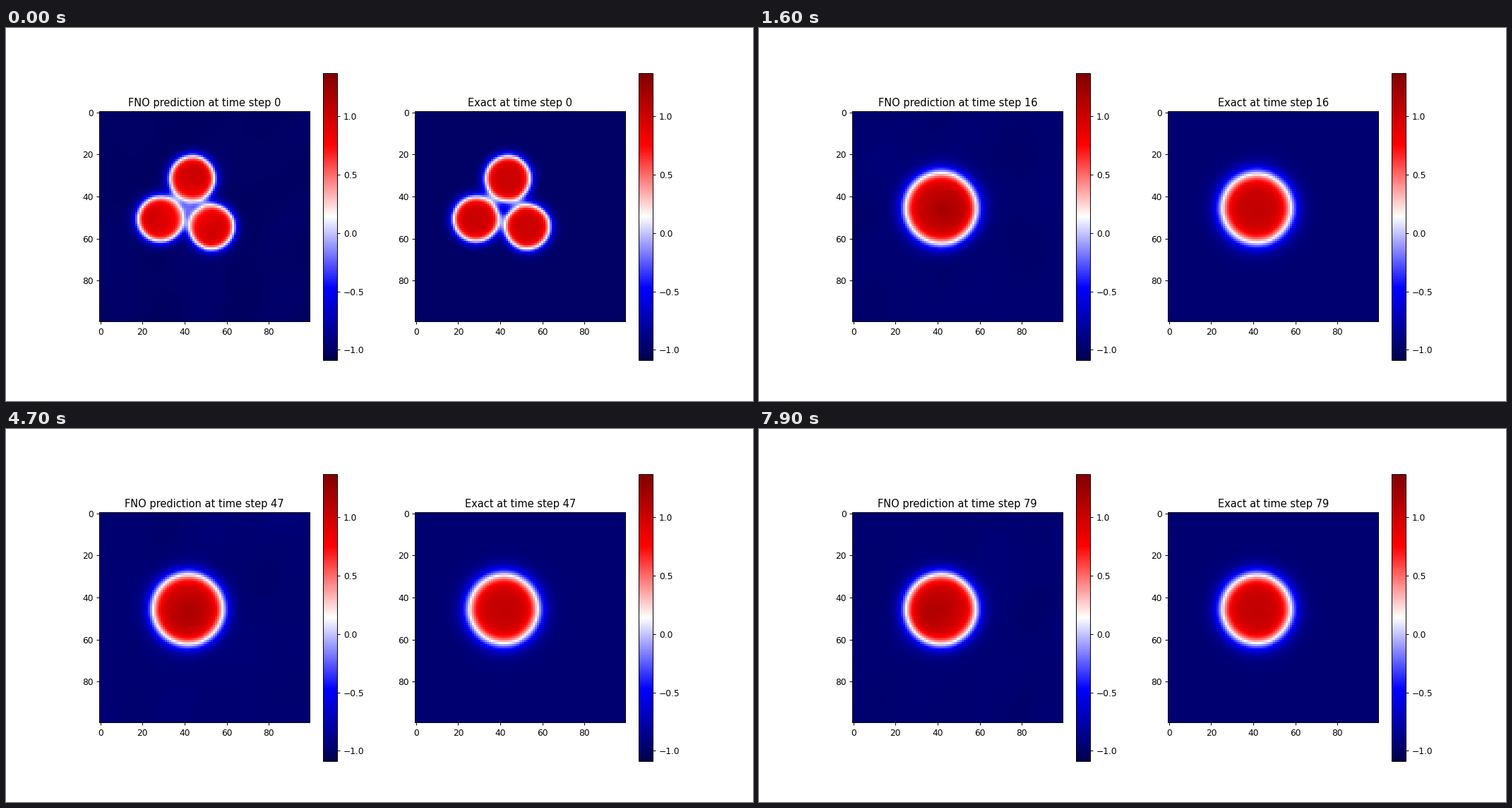
A matplotlib script that plays this animation: 1058x529 px, repeating every 8000 ms.

```python
import numpy as np
import matplotlib.pyplot as plt
from matplotlib.animation import FuncAnimation

N, STEPS = 100, 80
DPI = 529 / 6
VMIN, VMAX = -1.087, 1.37
DT = 2.0
DISCS = [(43.6, 31.7), (28.4, 51.0), (52.8, 54.7)]
CX, CY = 41.6, 45.9

plt.rcParams["font.family"] = "DejaVu Sans"
yy, xx = np.mgrid[0:N, 0:N].astype(float)
radius = np.hypot(xx - CX, yy - CY)


def start_field():
    u = -np.ones((N, N))
    for x, y in DISCS:
        u += 1 + np.tanh((10.8 - np.hypot(xx - x, yy - y)) / 2.6)
    return u


def evolve(eps, substeps, active):
    """Cahn-Hilliard flow; the field is held once it has settled."""
    kx = 2 * np.pi * np.fft.rfftfreq(N)
    ky = 2 * np.pi * np.fft.fftfreq(N)
    k2 = ky[:, None] ** 2 + kx[None, :] ** 2
    denom = 1 + DT * (2 * k2 + eps ** 2 * k2 ** 2)
    u = start_field()
    states = [u]
    for _ in range(active):
        for _ in range(substeps):
            force = np.fft.rfft2(u ** 3 - 3 * u)
            u = np.fft.irfft2((np.fft.rfft2(u) - DT * k2 * force) / denom,
                              s=(N, N))
        states.append(u)
    return states


exact = evolve(3.1, 42, 30)
slow = evolve(2.8, 24, 45)

rng = np.random.default_rng(4)
waves = [(*rng.uniform(-0.2, 0.2, 2), rng.uniform(0, 2 * np.pi),
          rng.uniform(-0.25, 0.25)) for _ in range(14)]


def ripple(step):
    return sum(np.sin(a * xx + b * yy + p + s * step) for a, b, p, s in waves)


def exact_field(step):
    return exact[min(step, len(exact) - 1)]


def predicted_field(step):
    u = slow[min(step, len(slow) - 1)]
    inside = np.clip((u + 0.2) / 1.2, 0, 1) ** 2
    fade = np.exp(-1.2 * step)
    core = np.interp(step, [0, 7, 16, 32, 47, 57, 79],
                     [0, 0.08, 0.2, 0.17, 0.12, 0.1, 0.08])
    out = u + ripple(step) * (0.004 + 0.008 * inside)
    out += fade * 0.4 * np.exp(-(radius / 3) ** 2)
    out -= fade * 0.22 * inside * np.exp(-(radius / 12) ** 2)
    out += core * inside * np.exp(-radius / 6)
    return np.clip(out, VMIN, VMAX)


fig, axes = plt.subplots(1, 2, figsize=(1058 / DPI, 529 / DPI), dpi=DPI)
fig.subplots_adjust(right=0.8998, top=0.8795)
panels = []
for ax, label, field in zip(axes, ("FNO prediction", "Exact"),
                            (predicted_field, exact_field)):
    im = ax.imshow(field(0), cmap="seismic", vmin=VMIN, vmax=VMAX,
                   interpolation="nearest")
    fig.colorbar(im, ax=ax)
    title = ax.set_title(f"{label} at time step 0", fontsize=11.93)
    panels.append((im, title, label, field))


def draw(step):
    for im, title, label, field in panels:
        im.set_data(field(step))
        title.set_text(f"{label} at time step {step}")
    return [p[0] for p in panels]


anim = FuncAnimation(fig, draw, frames=STEPS, interval=100, repeat=True,
                     repeat_delay=0, blit=False)
plt.show()
```
